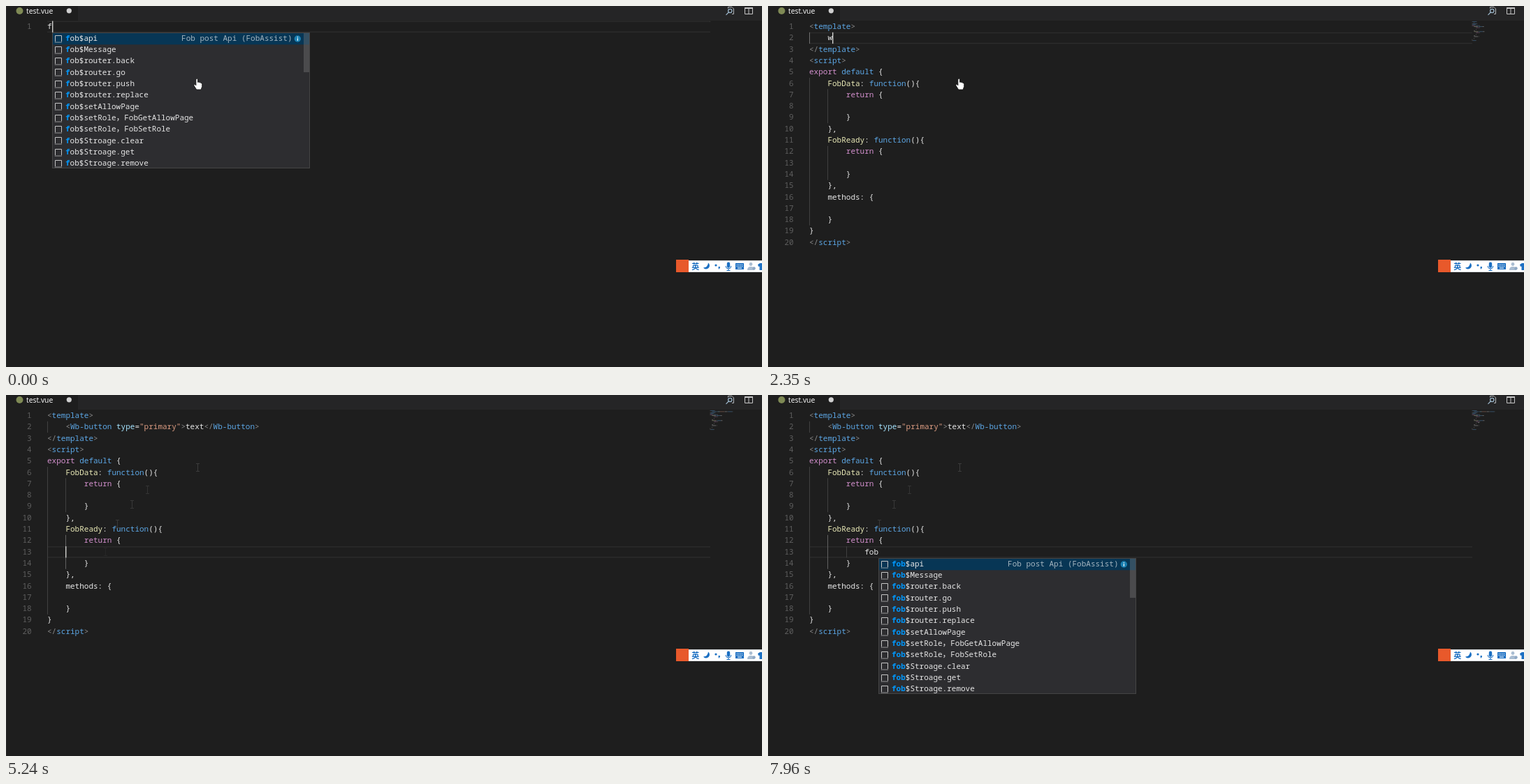
An HTML page with a canvas for the animation above (8 s loop, 1082 by 518 pixels).

```html
<!DOCTYPE html>
<html lang="en">
<head>
<meta charset="utf-8">
<title>Editor snippets</title>
<style>
html, body { margin: 0; width: 100%; height: 100%; overflow: hidden; background: #1e1e1e; }
canvas { display: block; }
</style>
</head>
<body>
<canvas id="stage" width="1082" height="518"></canvas>
<script>
const ctx = document.getElementById('stage').getContext('2d');
const LOOP = 8000, CHAR = 6.6, ROW = 16.3, LEFT = 59, TOP = 21.5;
const MONO = '11px "Noto Sans Mono", "DejaVu Sans Mono", monospace';
const CJK = '12px "Noto Sans CJK SC", "Noto Sans CJK", sans-serif';
const PLAIN = '#e6e6e6';
const colX = c => LEFT + c * CHAR;
const lineY = n => TOP + (n - 1) * ROW;

// A backtick plus one letter starts a run in that colour
const INK = { g: '#8a8a8a', b: '#5ca6e4', a: '#a6e4ff', s: '#dc9c82', k: '#d28fcc', y: '#e8e8b6', w: PLAIN };
const BUTTON = '    `g<`bWb-button `atype`w=`s"primary"`g>`wtext`g</`bWb-button`g>';
const PAGE = [
  '`g<`btemplate`g>', '', '`g</`btemplate`g>', '`g<`bscript`g>',
  '`kexport `bdefault `w{',
  '    `yFobData`w: `bfunction`w(){', '        `kreturn `w{', '', '        `w}', '    `w},',
  '    `yFobReady`w: `bfunction`w(){', '        `kreturn `w{', '', '        `w}', '    `w},',
  '    `wmethods: {', '', '    `w}', '`w}', '`g</`bscript`g>'
];

// Square brackets mark the matched letters
const BASE = ['fob$api', 'fob$Message', 'fob$router.back', 'fob$router.go', 'fob$router.push',
  'fob$router.replace', 'fob$setAllowPage', 'fob$setRole，FobGetAllowPage', 'fob$setRole，FobSetRole',
  'fob$Stroage.clear', 'fob$Stroage.get', 'fob$Stroage.remove'];
const NARROW = ['[FobTe]mplate', '[fob]$[T]oast.[e]rror', '[fo]b$Util.[set]Class', '[fob]$rou[te]r.back',
  '[fob]$rou[te]r.go', '[fob]$rou[te]r.push', '[fob]$rou[te]r.replace', '[fob]$s[et]AllowPage',
  '[fob]$s[et]Role，FobGetAllowPage', '[fob]$s[et]Role，FobSetRole', '[Fob]Crea[te]d', '[fo]b$Stroage.[set]'];
const TAGS = ['button', 'input', 'select', 'option', 'table', 'column', 'modal', 'radio', 'checkbox', 'page', 'tabs', 'tree']
  .map(s => 'Wb-' + s);
const mark = (rows, n) => rows.map(s => '[' + s.slice(0, n) + ']' + s.slice(n));

const API = 'Fob post Api (FobAssist)';
const EACH = 'Code snippet for "forEach" (MintLadder Phrase…';
const baseList = n => ({ rows: mark(BASE, n), note: API, bar: 57 });
const narrowList = { rows: NARROW, note: 'A string template to be used as the …', bar: 98 };
const eachList = n => ({ rows: mark(['fo', ...BASE.slice(0, 11)], n), note: EACH, bar: 42 });
const tagList = { rows: mark(TAGS, 1), note: 'Button tag (FobAssist)', bar: 70 };

// [start, list, line, column]
const POPUPS = [
  [0, baseList(1), 1, 1], [90, baseList(2), 1, 2], [400, baseList(3), 1, 3],
  [550, narrowList, 1, 4], [780, narrowList, 1, 5], [1330],
  [2440, tagList, 2, 5], [3070],
  [6800, eachList(1), 13, 13], [6950, eachList(2), 13, 14], [7230, baseList(3), 13, 15]
];
const BLINKS = [1170, 1330, 1800, 2270, 3620, 4100, 4620, 5090, 5640, 5790, 6190, 6730, 7680];
const TRAIL = [[274, 104], [202, 136], [180, 157], [159, 185], [142, 225]];

const passed = (t, times) => times.filter(s => s <= t).length;
const within = (t, a, b) => t >= a && t < b;

function box(x, y, w, h, color) {
  ctx.fillStyle = color;
  ctx.fillRect(x, y, w, h);
}
function disc(x, y, r, color) {
  ctx.fillStyle = color;
  ctx.beginPath();
  ctx.arc(x, y, r, 0, 7);
  ctx.fill();
}
function stroke(d, color, width = 1) {
  ctx.strokeStyle = color;
  ctx.lineWidth = width;
  ctx.stroke(new Path2D(d));
}
function fill(d, color) {
  ctx.fillStyle = color;
  ctx.fill(new Path2D(d));
}
function text(s, x, y, color, font = MONO, align = 'left') {
  ctx.font = font;
  ctx.textAlign = align;
  ctx.fillStyle = color;
  ctx.fillText(s, x, y);
}

function runs(line) {
  let col = 0;
  return line.split('`').map((part, i) => {
    const run = { s: i ? part.slice(1) : part, color: INK[i ? part[0] : 'w'], col };
    col += run.s.length;
    return run;
  });
}

function drawCode(lines) {
  lines.forEach((line, i) => {
    const y = lineY(i + 1);
    text(i + 1, 36.6, y + 11.5, '#5e5e5e', MONO, 'right');
    for (const { s, color, col } of runs(line)) {
      text(s, colX(col), y + 11.5, color);
      ctx.globalAlpha = lines.length === 1 ? 0.15 : 0.4;
      for (const m of s.matchAll(/\S+/g))
        box(1007.5 + (col + m.index) * 0.715, 22 + i * 1.43, m[0].length * 0.715, 0.9, color);
      ctx.globalAlpha = 1;
    }
  });
}

function guide(col, from, to, color = '#404040') {
  box(Math.round(colX(col)), lineY(from), 1, (to - from + 1) * ROW, color);
}

function drawIcon(x, y) {
  stroke(`M${x + .5} ${y + 9}V${y + .5}H${x + 9.5}V${y + 9}`, '#c5c5c5');
  for (let i = 0; i < 5; i++) box(x + i * 2.1, y + 9.5, 1.2, 1.2, '#c5c5c5');
}

function drawRow(row, x, y) {
  row.split(/[[\]]/).forEach((part, i) => {
    const hit = i % 2;
    part.split('，').forEach((s, j) => {
      if (j) {
        text('，', x, y, PLAIN, CJK);
        x += 11.6;
      }
      text(s, x, y, hit ? '#0097fb' : PLAIN, hit ? 'bold ' + MONO : MONO);
      x += s.length * CHAR;
    });
  });
}

function drawPopup([, list, line, col]) {
  if (!list) return;
  const x = Math.round(colX(col)), y = Math.ceil(lineY(line + 1)), h = 195;
  box(x, y, 369, h, '#454545');
  box(x + 1, y + 1, 367, h - 2, '#2d2d30');
  box(x + 1, y + 1, 367, ROW, '#073655');
  list.rows.forEach((row, i) => {
    const top = y + i * ROW;
    drawIcon(x + 4, Math.round(top + 3.5));
    drawRow(row, x + 19, top + 11.8);
  });
  text(list.note, x + 343.5, y + 11.8, '#a4b4bf', MONO, 'right');
  disc(x + 351.3, y + 9, 4.7, '#1b80b2');
  box(x + 350.8, y + 6, 1.2, 1.2, '#fff');
  box(x + 350.8, y + 8.2, 1.2, 3.6, '#fff');
  box(x + 360, y + 1, 8, list.bar - 1, 'rgba(121, 121, 121, 0.4)');
}

function drawHand(x, y) {
  ctx.save();
  ctx.translate(x, y);
  const d = 'M-2.6-7Q-1.2-8.6 0-7V-2.6Q1.4-3.4 2.3-2.2Q3.6-2.8 4.4-1.6Q6.2-1.8 6.2 .4V3.4L4.6 8H-1.8L-5.6 2Q-6 0-4.2 .4L-2.6 2Z';
  fill(d, '#fff');
  stroke(d, '#111', 0.8);
  ctx.restore();
}
function drawBeam(x, y, color = '#3f3f3f') {
  stroke(`M${x - 2} ${y - 5.5}H${x + 3}M${x + .5} ${y - 5.5}V${y + 5.5}M${x - 2} ${y + 5.5}H${x + 3}`, color);
}

function drawPointer(t) {
  if (t < 1260 || within(t, 2350, 3000)) drawHand(274.5, 112);
  else if (t < 2350) drawBeam(...TRAIL[0]);
  else if (t >= 4150) {
    const step = Math.floor((t - 4400) / 76.7) + 1;
    const p = Math.max(0, Math.min(4, step * 0.4));
    const i = Math.floor(p), f = p - i;
    // Typing repaints the line under the last mark
    const marks = TRAIL.slice(0, t < 6730 ? i + 1 : 4);
    marks.forEach(([x, y], k) => drawBeam(x, y, ['#3c3c3c', '#343434', '#383838', '#383838', '#272727'][k]));
    if (f) {
      const [a, b] = [TRAIL[i], TRAIL[i + 1]];
      drawBeam(Math.round(a[0] + (b[0] - a[0]) * f), Math.round(a[1] + (b[1] - a[1]) * f));
    }
  }
}

function drawTabs() {
  box(0, 0, 1082, 21, '#252526');
  box(0, 0, 103, 21, '#1e1e1e');
  box(0, 0, 1, 518, '#282828');
  disc(19.5, 7, 5, '#7f8a55');
  text('test.vue', 29, 11.2, '#fff', '10.4px "Open Sans", "Noto Sans", sans-serif');
  disc(90.3, 6.8, 3.6, '#d0d0d0');
  stroke('M1033.5 3.5V1.5H1039L1041.5 4V11.5H1039', '#b0b4b8');
  stroke('M1039 7A2.7 2.7 0 1 1 1033.6 7A2.7 2.7 0 1 1 1039 7M1034.3 9L1030.5 12.8', '#9db8cc', 1.2);
  stroke('M1057.5 2.5H1068.5V11.5H1057.5ZM1063 2V12', '#c5c5c5');
  box(1057, 2, 12, 2, '#c5c5c5');
}

function drawInputBar() {
  const blue = '#1b6fc2', pale = '#a9bdd2';
  box(968, 365, 114, 17, '#d9dde1');
  box(968, 366, 114, 15, '#fff');
  box(959, 364, 18, 18, '#e8592b');
  text('英', 981.3, 377.6, blue, 'bold 11px "Noto Sans CJK SC", "Noto Sans CJK", sans-serif');
  fill('M1005 368.5A5 5 0 1 1 998 375.5Q1004.5 375 1005 368.5Z', blue);
  disc(1016, 372, 1.6, blue);
  fill('M1019.5 374H1022Q1022.5 376.5 1020 378Z', blue);
  stroke('M1034 370V373.5', blue, 4.4);
  disc(1034, 369.8, 2.2, blue);
  disc(1034, 373.5, 2.2, blue);
  stroke('M1030 373Q1030.3 377 1034 377T1038 373M1034 377V379.5M1031.5 379.5H1036.5', blue);
  box(1044, 369, 12, 9, blue);
  for (let i = 0; i < 8; i++) box(1045.7 + i % 4 * 2.4, 370.8 + (i >> 2) * 2.2, 1.2, 1.2, '#fff');
  box(1047, 375.5, 6, 1.1, '#fff');
  disc(1066, 370.5, 2.4, pale);
  fill('M1061 379Q1061 374 1066 374T1071 379Z', pale);
  disc(1070.5, 376.5, 2.2, '#8ea8c4');
  fill('M1076 371L1079 369H1082V379H1078.5V373.5L1077 374Z', blue);
}

function draw(t) {
  const opened = t >= 1330, button = t >= 3070;
  const selecting = within(t, 3070, 5240);
  const typed = opened ? 'fob'.slice(0, passed(t, [6730, 6950, 7120]))
    : 'fobte'.slice(0, 1 + passed(t, [90, 310, 550, 690]));
  let caret = [1, typed.length];
  if (opened) caret = [2, t < 2270 ? 4 : 5];
  if (button) caret = [2, 34];
  if (t >= 5240) caret = [13, t < 5790 ? 4 : 12 + typed.length];

  box(0, 0, 1082, 518, '#1e1e1e');
  drawTabs();

  const y = lineY(caret[0]);
  if (!selecting) {
    box(LEFT, y, 949, 1.4, '#2c2c2c');
    box(LEFT, y + ROW - 1.2, 949, 1.4, '#2c2c2c');
  }

  let lines = [typed];
  if (opened) {
    lines = PAGE.slice();
    lines[1] = button ? BUTTON : t >= 2270 ? '    w' : '';
    if (typed) lines[12] = ' '.repeat(12) + typed;
    guide(0, 2, 2, button ? '#404040' : '#707070');
    guide(0, 6, 18);
    guide(4, 7, 9);
    guide(4, 12, 14, t >= 5240 ? '#606060' : '#404040');
    if (t >= 5790) guide(8, 13, 13);
  }
  if (selecting) {
    box(257, 38, 28, 16.5, '#40607f');
    box(362.3, 38, 1.2, 16.5, '#5f7482');
  }
  drawCode(lines);
  if (passed(t, BLINKS) % 2 === 0) box(Math.round(colX(caret[1])), y, 1.4, ROW, '#d0d0ce');

  drawPopup(POPUPS[passed(t, POPUPS.map(p => p[0])) - 1]);
  drawPointer(t);
  drawInputBar();
}

const start = performance.now();
function tick() {
  draw((performance.now() - start) % LOOP);
  requestAnimationFrame(tick);
}
tick();
</script>
</body>
</html>
```
